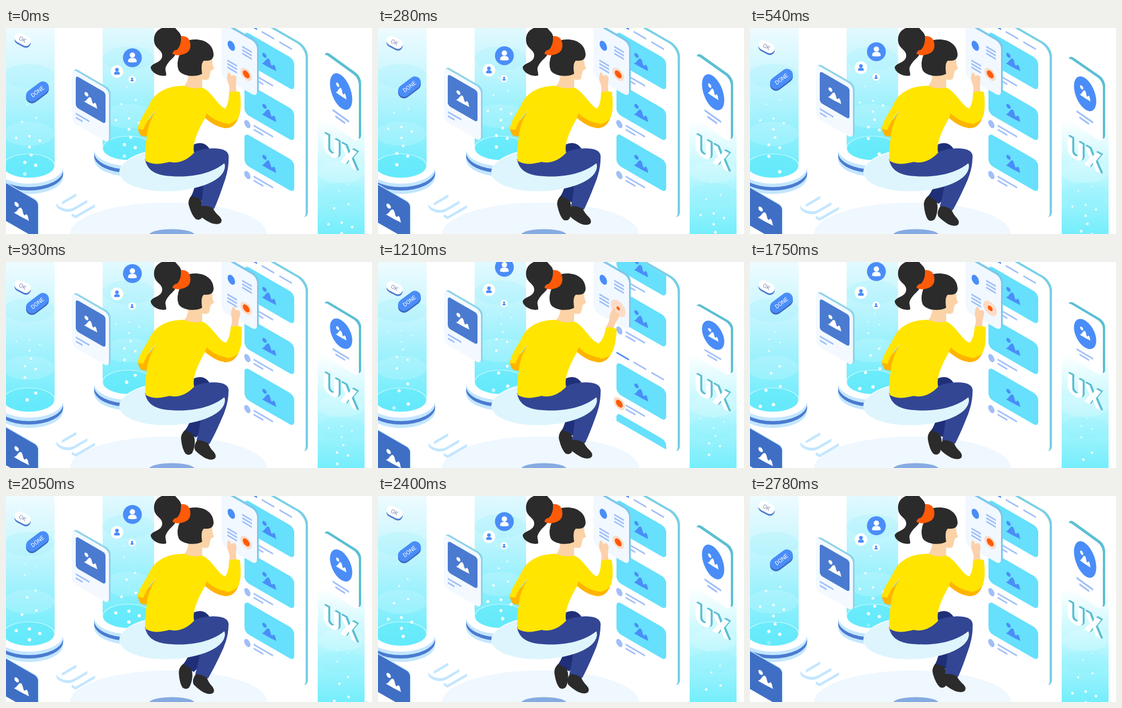
These frames come from a looping animation (640x360 px, 2.81 s). An HTML page:

```html
<!DOCTYPE html>
<html lang="en">
<head>
<meta charset="utf-8">
<title>Interface studio</title>
<style>
html, body { margin: 0; width: 100%; height: 100%; overflow: hidden; background: #fff; }
svg { display: block; width: 640px; height: 360px; }
text { font-family: Roboto, Arial, sans-serif; }
</style>
</head>
<body>
<svg id="stage" viewBox="0 0 640 360" xmlns="http://www.w3.org/2000/svg"></svg>
<script>
const LOOP = 2810;
const BLUE = '#4a8df8', DEEP = '#4a7bd0', PALE = '#a0bef8', ICE = '#c3e6ff', TEAL = '#5bbfd3';
const SKIN = '#fcd0ab', FACE = '#fcd3a6', DARK = '#2b2b2b', YELLOW = '#ffe500', AMBER = '#ffb400', ORANGE = '#ff5a08';

// ---- drawing helpers ----
const path = (d, fill) => `<path d="${d}" fill="${fill}"/>`;
const oval = (x, y, rx, ry, fill, more = '') =>
  `<ellipse cx="${x}" cy="${y}" rx="${rx}" ry="${ry}" fill="${fill}" ${more}/>`;
const iso = (x, y, body) => `<g transform="translate(${x} ${y}) skewY(30)">${body}</g>`;
const box = (x, y, w, h, r, fill) =>
  `<rect x="${x}" y="${y}" width="${w}" height="${h}" rx="${r}" fill="${fill}"/>`;
const isoBox = (x, y, w, h, r, fill) => iso(x, y, box(0, 0, w, h, r, fill));
const bar = (x, y, w, fill = PALE, t = 3) => isoBox(x, y, w, t, .6, fill);
const group = (id, body) => `<g id="${id}">${body}</g>`;

const picture = (x, y, fill, k = 1) => iso(x, y, `<g transform="scale(${k})" fill="${fill}">
  <circle cx="-8" cy="-6.5" r="3.7"/>
  <path d="M-13 10 C-8 8 -5 -4 -1 -5 C3 -5 2 4 5 4 C7 3 7 0 9 .5 C12 2 11 7 13 9 Q0 10.5 -13 10Z"/></g>`);

const person = (id, x, r, disc, ink) => group(id, `<g transform="translate(${x} 0)">
  <circle r="${r}" fill="${disc}"/>
  <g transform="scale(${r / 16.5})" fill="${ink}"><circle cy="-4.5" r="4.7"/>
  <path d="M-7.5 7.5 Q-8 1 -2.5 .5 L2.5 .5 Q8 1 7.5 7.5 Q0 9 -7.5 7.5Z"/></g></g>`);

const ring = (x, y, ids = ['', '']) => iso(x, y,
  `<circle id="${ids[0]}" r="10" fill="#fbdcc9"/><circle id="${ids[1]}" r="6" fill="${ORANGE}"/>`);

// ---- scene parts ----
function column(dx, dy) {
  const base = [[18, ICE], [12, DEEP], [6, ICE], [0, '#fff']]
    .map(([d, c]) => oval(40, 242 + d, 60, 30, c)).join('');
  return `<g transform="translate(${dx} ${dy})">${base}
    <path d="M-5 -10 H85 V241 A45 21 0 0 1 -5 241Z" fill="url(#beam)"/>
    ${oval(40, 84, 45, 21, '#8ee9fa', 'opacity=".2"')}
    ${oval(40, 185, 45, 21, '#fff', 'opacity=".15"')}
    ${oval(40, 241, 45, 21, '#62eafb', 'opacity=".6" stroke="#fff" stroke-width="1.2"')}
    <g class="bubbles"></g></g>`;
}

function feed() {
  let s = bar(417, -12, 22, BLUE) + bar(447, 5, 22) + bar(478, 23, 22);
  for (let i = 0; i < 3; i++) {
    const y = 89 * i;
    s += isoBox(417, 5 + y, 87, 55, 8, '#66e0fc') + picture(460, 59 + y, BLUE) +
      (i ? iso(422, 79 + y, oval(0, 0, 5.5, 6.5, PALE)) : ring(422, 79)) +
      bar(433, 80 + y, 34) + bar(433, 87 + y, 17);
  }
  return s;
}

function letters(word, size, weight, side, depth, dx, dy) {
  let s = '';
  for (let i = depth; i >= 0; i--)
    s += `<text x="${dx * i}" y="${dy * i}" font-size="${size}" font-weight="${weight}" fill="${i ? side : '#fff'}">${word}</text>`;
  return s;
}

function pill(id, x, turn, w, h, face, side, ink, word) {
  const shape = (dy, c) => `<g transform="translate(${x} ${dy}) rotate(${turn})">${box(-w / 2, -h / 2, w, h, h / 2, c)}</g>`;
  return group(id, shape(3, side) + shape(0, face) +
    `<text transform="translate(${x} 0) rotate(${turn})" y="3.6" font-size="10" text-anchor="middle" fill="${ink}">${word}</text>`);
}

const leftCard = isoBox(118, 69, 65, 94, 8, '#8fd3e8') + isoBox(115, 71, 65, 93, 8, '#f3f9ff') +
  isoBox(122, 83, 52, 55, 5, DEEP) + picture(148, 126, '#fff', .92) + bar(122, 148, 24) + bar(122, 155, 12);

const lowCard = isoBox(-8, 265, 65, 65, 6, ICE) + isoBox(-9, 266, 65, 66, 6, '#3f6fc5') + picture(27, 320, '#fff', 1.05);

const rightCard = isoBox(557, 70, 64, 91, 9, TEAL) + isoBox(554, 73, 63, 91, 9, '#fff') +
  iso(586, 128, oval(0, 0, 19.5, 23, BLUE)) + picture(586, 127, '#fff', .75) + bar(571, 152, 29) + bar(576, 161, 17);

const popup = isoBox(381, -11, 61, 94, 9, '#7cc8ea') + isoBox(377, -9, 62, 94, 9, '#f1f8ff') +
  iso(394, 31, oval(0, 0, 6.5, 8, BLUE)) +
  [0, 6, 12].map(d => bar(413, 31 + d, 17) + bar(387, 55 + d, 17)).join('');

const backLeg = path('M335 235 L372 246 Q358 285 345 303 L323 296 Q334 275 335 235Z', '#1f3079') +
  path('M324 293 Q317 302 320 311 Q325 328 332 334 Q339 337 343 331 Q346 321 344 310 Q342 299 336 297Z', DARK);

const frontLeg = path('M345 225 L389 222 Q391 245 380 274 Q372 298 364 316 L341 311 Q347 280 345 225Z', '#334694') +
  path('M342 311 Q336 322 340 329 Q348 336 359 341 Q371 345 376 340 Q379 335 373 329 Q365 322 362 315 Q352 310 342 311Z', DARK);

const body =
  path('M327 204 Q347 195 357 213 L326 222Z', '#1f3079') +
  path('M243 229 Q285 240 326 218 C350 207 387 207 389 222 Q391 232 381 237 C354 258 315 261 290 259 C263 258 247 250 243 229Z', '#334694') +
  path('M319 82 Q318 96 310 103 Q328 115 343 104 L343 90 Q353 92 355 88 L358 75 L364 71 Q359 62 361 48 L340 48 Z', FACE) +
  path('M264 142 L250 160 L231 172 Q230 182 237 189 L247 190Z', AMBER) +
  path('M311 101 C282 101 262 112 252 131 C246 146 232 160 231 176 L240 178 Q248 157 264 142 C252 160 247 176 246 192 Q242 213 244 232 C258 241 273 237 286 234 C302 238 318 230 329 218 Q324 198 349 156 C364 167 378 170 386 170 L384 141 C371 137 358 108 342 104 Q329 108 311 101Z', YELLOW);

const arm = group('forearm',
  group('hand', path('M390 114 Q392 104 389 97 Q386 91 387 83 Q388 77 391 78 L394 84 Q401 80 403 87 Q403 93 402 100 L403 114Z', SKIN)) +
  path('M390 113 Q400 109 409 112 Q413 144 406 158 Q399 172 382 171 L374 150 L383 141 Q390 133 390 113Z', YELLOW) +
  path('M383 169 Q398 167 406 158 Q399 176 382 175Z', AMBER)) +
  path('M351 149 C361 160 377 166 388 167 L387 175 C372 175 359 167 348 157Z', AMBER);

const head =
  path('M321 21 C341 17 362 25 363 46 Q363 59 346 57 Q340 62 343 80 C330 87 308 84 302 74 Q297 62 304 45Z', DARK) +
  path('M294 -2 C274 -5 257 4 259 23 C260 37 275 38 273 50 C271 61 258 60 253 68 C253 78 269 86 280 83 C281 76 276 73 281 65 C287 54 298 50 298 40 C306 31 310 20 304 9Z', DARK) +
  path('M306 14 Q319 13 322 25 Q325 42 310 46 Q299 50 291 45 Q292 39 299 38 Q307 30 306 14Z', ORANGE);

const seat = `<g transform="rotate(-3 290 248)">${oval(291, 246, 92, 37, '#fff')}${oval(290, 248, 92, 37, '#def5fd')}</g>`;

const stage = document.getElementById('stage');
stage.innerHTML = `<defs>
  <linearGradient id="beam" x1="0" y1="0" x2="0" y2="1">
    <stop offset="0" stop-color="#f2fcff"/><stop offset=".35" stop-color="#caf6fe"/><stop offset="1" stop-color="#66ebfc"/></linearGradient>
  <linearGradient id="mist" x1="0" y1="0" x2="0" y2="1">
    <stop offset="0" stop-color="#fff"/><stop offset="1" stop-color="#74eefc"/></linearGradient>
  <clipPath id="screen"><rect width="127" height="304" rx="16" transform="translate(397 -38) skewY(30)"/></clipPath>
  </defs>` +
  oval(284, 360, 172, 55, '#eff7ff') + oval(290, 362, 40, 10.5, '#86abe2') +
  column(0, 0) + column(174, -31) +
  group('ui', `<g transform="matrix(.866 .5 -.866 .5 79 303)">${letters('UI', 56, 700, ICE, 5, 1, 1)}</g>`) +
  group('lowCard', lowCard) +
  pill('ok', 29, 28, 30, 17, '#fff', DEEP, '#7f8fb5', 'OK') +
  pill('done', 55, -37, 45, 21, BLUE, '#3d6ac2', '#fff', 'DONE') +
  group('leftCard', leftCard) +
  person('big', 221, 16.5, BLUE, '#fff') + person('mid', 194, 11, '#fff', BLUE) + person('small', 220.5, 6.5, '#fff', BLUE) +
  isoBox(401, -40, 127, 304, 16, '#78cfe6') + isoBox(397, -38, 127, 304, 16, '#fff') +
  `<g clip-path="url(#screen)"><g id="feed">${feed()}<g transform="translate(0 306)">${feed()}</g></g></g>` +
  popup + ring(420, 81, ['halo', 'core']) +
  group('backLeg', backLeg) + group('frontLeg', frontLeg) + seat + body + arm + head +
  `<rect x="545" y="160" width="82" height="200" fill="url(#mist)"/>` +
  oval(586, 252, 41, 19, '#fff', 'opacity=".16"') + oval(586, 290, 41, 19, '#7deafa', 'opacity=".16"') +
  `<g transform="translate(546 151)"><g class="bubbles"></g></g>` +
  group('rightCard', rightCard) +
  group('ux', iso(553, 215, letters('UX', 47, 900, TEAL, 4, .9, -.9)));

// ---- bubbles: one rising pattern shared by the three beams ----
const RISE = 160;
const seeds = [[53, 157], [28, 164], [41, 189], [18, 192], [59, 197], [41, 208],
  [44, 222], [33, 235], [52, 240], [33, 255], [52, 122], [37, 134]];
function bubbles(t) {
  let s = '';
  for (const [x, y0] of seeds)
    for (let y = y0 - RISE * t / LOOP + RISE; y > 70; y -= RISE) {
      if (y > 257) continue;
      const k = (y - 70) / 187;
      s += `<circle cx="${x}" cy="${y.toFixed(2)}" r="${(.8 + 2.3 * k).toFixed(2)}" fill="#fff" opacity="${Math.min(.9, .1 + k * 1.5, (258 - y) / 5).toFixed(2)}"/>`;
    }
  return s;
}

// ---- motion: smooth curves through a few poses ----
const KEYS = [0, 540, 930, 1210, 1490, 2050, 2780];
function track(...v) {
  v = [0, ...v, 0];
  const grad = KEYS.slice(1).map((k, i) => (v[i + 1] - v[i]) / (k - KEYS[i]));
  const slope = v.map((_, i) => {
    const a = grad[i - 1], b = grad[i];
    return a * b > 0 ? 2 * a * b / (a + b) : 0;
  });
  return t => {
    if (t >= 2780) return 0;
    let i = 0;
    while (t >= KEYS[i + 1]) i++;
    const h = KEYS[i + 1] - KEYS[i], u = (t - KEYS[i]) / h, w = 1 - u;
    return v[i] * (1 + 2 * u) * w * w + slope[i] * h * u * w * w +
      v[i + 1] * u * u * (3 - 2 * u) - slope[i + 1] * h * u * u * w;
  };
}
const pills = track(.51, .91, 1, 1, .74);
const cards = track(.35, .78, 1, 1, .565);
const people = track(.24, .72, .97, 1, .45);
const squash = track(.23, .84, 1, 1, .61);
const word = track(.42, .78, 1, 1, .58);
const reach = track(0, .35, 1, .75, 0);
const press = track(0, 0, .95, 1, 0);

const el = id => document.getElementById(id);
const move = (id, value) => el(id).setAttribute('transform', value);
const drop = (id, y) => move(id, `translate(0 ${y.toFixed(2)})`);
const beams = document.querySelectorAll('.bubbles');

function draw(t) {
  const p = pills(t), c = cards(t), a = people(t), r = reach(t), tap = press(t);
  drop('ok', 20 + 25 * p);
  drop('done', 111 - 43 * p);
  drop('leftCard', -23 * c);
  drop('lowCard', 23 * c);
  drop('big', 52 - 44 * a);
  drop('mid', 76 - 28 * a);
  drop('small', 90 - 18 * a);
  drop('ui', 10 * word(t));
  drop('ux', 12 * word(t));
  move('rightCard', `translate(0 196) scale(1 ${1.25 - .25 * squash(t)}) translate(0 -196)`);

  const u = Math.pow(Math.min(1, Math.max(0, (t - 930) / 690)), .85);
  drop('feed', -306 * u * u * (3 - 2 * u));

  const swing = (1 - Math.cos(4 * Math.PI * t / LOOP)) / 2;
  move('frontLeg', `rotate(${6.8 * swing} 334 225)`);
  move('backLeg', `rotate(${12.8 * swing} 316 230)`);
  move('forearm', `rotate(${9.5 * r} 383 165)`);
  move('hand', `rotate(${16 * r} 397 112)`);
  el('halo').setAttribute('r', 10 + 3.4 * tap);
  el('core').setAttribute('r', 6 - 3.2 * tap);

  const dots = bubbles(t);
  beams.forEach(b => { b.innerHTML = dots; });
}

const start = performance.now();
function tick() {
  draw((performance.now() - start) % LOOP);
  requestAnimationFrame(tick);
}
tick();
</script>
</body>
</html>
```
